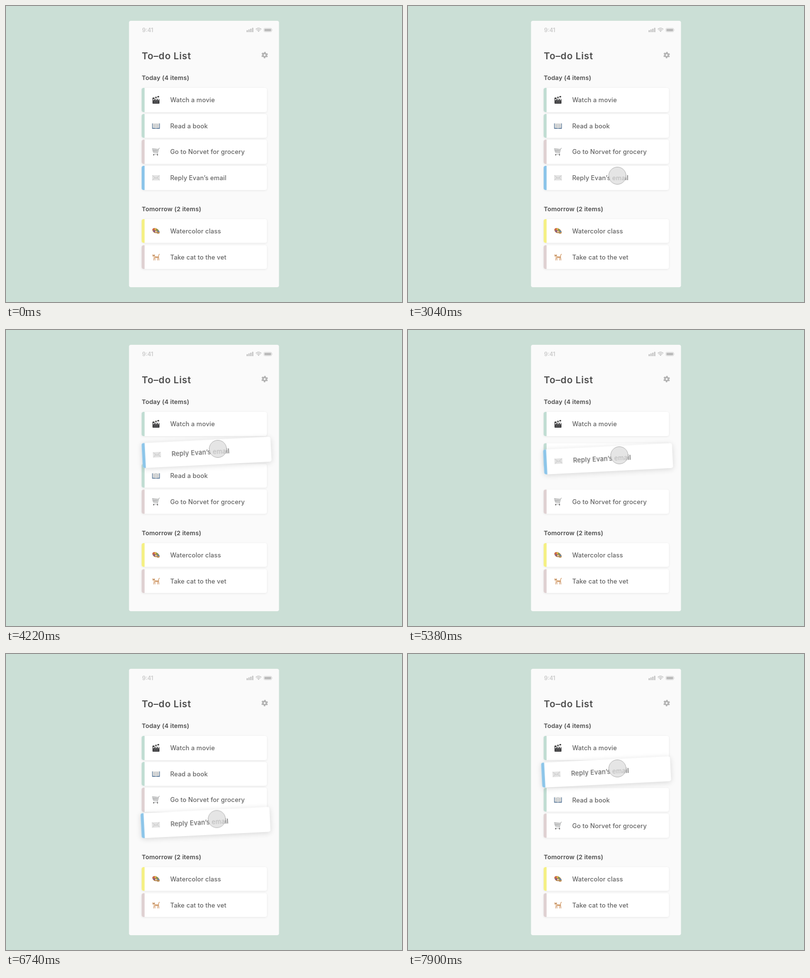
These frames come from a looping animation (800x600 px, 8000 ms). An HTML page:

```html
<!DOCTYPE html>
<html lang="en">
<head>
<meta charset="utf-8">
<title>To-do list</title>
<style>
  html, body { margin: 0; width: 100%; height: 100%; overflow: hidden; background: #cbdfd6; }
  #view { position: relative; width: 800px; height: 600px; font-family: Inter, sans-serif; background: #fafafa; clip-path: inset(30px 248.5px round 4px); }
  #view > svg { position: absolute; left: 0; top: 0; }
  .row { position: absolute; left: 274px; width: 252.5px; height: 48.5px; }
  .card { position: absolute; inset: 0; border-radius: 4px; background: #fff; box-shadow: 0 1px 4px rgba(0, 0, 0, .08); }
  .bar { position: absolute; left: 0; top: 0; width: 6px; height: 100%; border-radius: 4px 0 0 4px; }
  .card svg { position: absolute; left: 20.8px; top: 16.3px; width: 16px; height: 16px; overflow: visible; }
  .card span { position: absolute; left: 57.7px; top: 0; line-height: 49.8px; font-size: 12.6px; font-weight: 500; letter-spacing: .15px; color: #636363; white-space: pre; }
  #touch { position: absolute; left: -18.25px; top: -18.25px; width: 36.5px; height: 36.5px; box-sizing: border-box; border-radius: 50%; border: 1px solid #b0b0b0; }
</style>
</head>
<body>
<div id="view">
  <svg width="800" height="600" font-weight="600" fill="#4c4c4c">
    <text x="275" y="52.8" font-size="11.2" fill="#c9c9c9">9:41</text>
    <text x="274.3" y="107.7" font-size="19" letter-spacing=".65">To–do List</text>
    <g font-size="12.4" letter-spacing=".18">
      <text x="274.3" y="150">Today (4 items)</text>
      <text x="274.3" y="415.5">Tomorrow (2 items)</text>
    </g>
    <g fill="#c4c4c4">
      <path d="M486 49h2.6v4H486zM489.7 47.6h2.6V53h-2.6zM493.4 46h2.6v7h-2.6zM497.1 44.2h2.6V53h-2.6z"/>
      <rect x="520.9" y="45" width="16" height="7.4" rx="2" fill="none" stroke="#d2d2d2" stroke-width=".8"/>
      <rect x="522.2" y="46.2" width="13.4" height="5" rx="1" fill="#b9b9b9"/>
      <path d="M537.6 47.4q1.4 1.3 0 2.6z"/>
      <path d="M508.2 50.4q2-1.6 4 0l-2 2.4z"/>
    </g>
    <g fill="none" stroke="#c0c0c0" stroke-width="1.5">
      <path d="M504.6 47.2q5.6-4.8 11.2 0M506.5 49.2q3.7-3 7.4 0"/>
    </g>
    <g transform="translate(522.5 99.5)">
      <circle r="3.5" fill="none" stroke="#b2b2b2" stroke-width="3"/>
      <circle r="5.5" fill="none" stroke="#b2b2b2" stroke-width="2.2" stroke-dasharray="2.9 2.86" stroke-dashoffset="-1.43"/>
    </g>
  </svg>
</div>
<script>
const LOOP = 8000, STEP = 20, PITCH = 52.5;
const view = document.getElementById('view');

const icons = {
  clapper: `<path d="M1 6.6h14V15a1 1 0 0 1-1 1H2a1 1 0 0 1-1-1z" fill="#3d3d3f"/>
    <path d="M.6 4.2 13.8.2l.8 2.5L1.4 6.8z" fill="#333"/>
    <path d="m3.6 3.3 2 2.1 2-.6-2-2.1zM8.2 1.9l2 2.1 2-.6-2-2.1zM3 6.8 1.8 9h2.3l1.2-2.2zM7.7 6.8 6.5 9h2.3L10 6.8zM12.3 6.8 11.1 9h2.3l1.2-2.2z" fill="#f2f2f2"/>
    <path d="M3 11.2h10M3 13.4h10" stroke="#77787a" stroke-width=".7"/>`,
  book: `<path d="M.2 3h15.6v10.8H.2z" fill="#4f6f92"/>
    <path d="M1.4 2.2Q5 1.5 8 3.2q3-1.7 6.6-1v10Q11 11.4 8 13q-3-1.6-6.6-.8z" fill="#eeeeec"/>
    <path d="M8 3.2V13M2.6 4.8h4M2.6 6.6h4M2.6 8.4h4M2.6 10.2h4M9.4 4.8h4M9.4 6.6h4M9.4 8.4h4M9.4 10.2h4" stroke="#a5a9ae" stroke-width=".8"/>`,
  cart: `<g transform="matrix(-1 0 0 1 16 0)"><path d="M2.6 3.6 15.4 2l-2 7.6-8.4.6z" fill="#ebebeb"/>
    <g fill="none" stroke="#97989a" stroke-width=".8"><path d="M.3 1.3h1.8L5 11.8l-.8 1.4h9.6M2.6 3.6 15.4 2l-2 7.6-8.4.6M3.5 6.6l11-.9M6 3.2l1.2 6.8M9.2 2.8l.6 7M12.4 2.4l-.6 7.2"/></g>
    <circle cx="5" cy="14.7" r="1.2" fill="#666"/><circle cx="12.6" cy="14.7" r="1.2" fill="#666"/></g>`,
  letter: `<rect x=".3" y="2.9" width="15.4" height="10.6" rx=".8" fill="#e3e3e3"/>
    <path d="M.6 13.2 6.2 7.8M15.4 13.2 9.8 7.8M.6 3.2 7 8.9q1 .8 2 0l6.4-5.7" fill="none" stroke="#bdbdbd" stroke-width=".8"/>`,
  palette: `<path d="M.7 4.6C2.6.6 9 1.6 13 5.8c3.4 3.8 3.2 7.4-.2 7.8-2.2.2-2.4-1.7-4.6-1.4-2.2.3-4-.1-5.6-2.2C1 8 .1 6 .7 4.6z" fill="#b0804f"/>
    <circle cx="3.3" cy="4.6" r="1.7" fill="#e0564d"/><circle cx="6.8" cy="4.1" r="1.6" fill="#f0c443"/>
    <circle cx="10.3" cy="6" r="1.6" fill="#62ab58"/><circle cx="4.2" cy="8.2" r="1.6" fill="#824fa0"/>
    <circle cx="12.8" cy="9" r="1.5" fill="#458fd0"/><circle cx="8" cy="9.4" r="1.3" fill="#f3ebdd"/>
    <path d="m6.4 6.2 8.2 7" stroke="#e0a850"/>`,
  cat: `<path d="M13.4 7.4q-.8-3.6 1.6-5.4" fill="none" stroke="#d59d6b" stroke-width="1.2" stroke-linecap="round"/>
    <path d="m1.2 2 1.3 1.2h1.8L5.6 2l.4 4.2q3.8.8 7.6.4.9 1.4.4 3.2H4Q2.8 8.6 2.4 7.4 0 6.4 1.2 2z" fill="#dfb084"/>
    <path d="m4 9.2-.9 5.4M5.8 9.4l.3 5.2M11.6 9.4l-.3 5.2M13.4 9.2l.7 5.4" stroke="#d3a076" stroke-width="1.3"/>
    <path d="M2 6q1.5 1.2 3 0l-.4 3.2-1.4-.4z" fill="#f6e7d6"/>
    <path d="M2.3 4.8h.8M4.1 4.8h.8" stroke="#4a3a30" stroke-width=".9"/>
    <path d="m8 6.8.4 2M10 6.9l.4 2M12 6.9l.4 2" stroke="#a96f41" stroke-width=".7"/>`
};

const GREEN = '#c1ddd3', PINK = '#dfd1d2', BLUE = '#8cc5e9', YELLOW = '#f5f084';
const items = [
  ['movie', 166.2, GREEN, 'clapper', 'Watch a movie'],
  ['read', 218.7, GREEN, 'book', 'Read a book'],
  ['shop', 271.2, PINK, 'cart', 'Go to Norvet for grocery'],
  ['paint', 431.9, YELLOW, 'palette', 'Watercolor class'],
  ['vet', 484.6, PINK, 'cat', 'Take cat to the vet'],
  ['mail', 323.7, BLUE, 'letter', 'Reply Evan’s email']
];
const rows = {};
for (const [id, top, color, icon, label] of items) {
  const row = rows[id] = document.createElement('div');
  row.className = 'row';
  row.style.top = top + 'px';
  row.innerHTML = `<div class="card"><div class="bar" style="background:${color}"></div>
    <svg viewBox="0 0 16 16">${icons[icon]}</svg><span>${label}</span></div>`;
  view.append(row);
}
const touch = document.createElement('div');
touch.id = 'touch';
view.append(touch);

// Monotone cubic through [time, value] points, held flat outside them
function curve(pts) {
  const n = pts.length;
  const rate = i => (pts[i + 1][1] - pts[i][1]) / (pts[i + 1][0] - pts[i][0]);
  const slope = pts.map((_, i) => {
    if (i === 0 || i === n - 1) return 0;
    const a = rate(i - 1), b = rate(i);
    return a * b > 0 ? 2 * a * b / (a + b) : 0;
  });
  return t => {
    if (t <= pts[0][0]) return pts[0][1];
    if (t >= pts[n - 1][0]) return pts[n - 1][1];
    let i = 0;
    while (t >= pts[i + 1][0]) i++;
    const [t0, v0] = pts[i], [t1, v1] = pts[i + 1];
    const d = t1 - t0, u = (t - t0) / d, w = 1 - u;
    return v0 * w * w * (1 + 2 * u) + v1 * u * u * (1 + 2 * w) + d * u * w * (slope[i] * w - slope[i + 1] * u);
  };
}

function play(el, style) {
  const frames = [];
  for (let t = 0; t <= LOOP; t += STEP) {
    frames.push({ offset: t / LOOP, easing: 'steps(1, end)', ...style(t) });
  }
  el.animate(frames, { duration: LOOP, iterations: Infinity });
}

const path = [
  [840, 577, 28], [1640, 449, 265], [1980, 449, 265], [2620, 423, 344],
  [3380, 423, 344], [3540, 424, 322], [3920, 427, 266], [4220, 428, 241], [4520, 427.8, 228], [4820, 427.5, 223],
  [5220, 427.5, 223], [5380, 427, 254], [5700, 426, 303], [5980, 425, 329], [6040, 424.8, 332.5], [6460, 424, 346],
  [6620, 424, 346], [6800, 426.5, 326], [7160, 426, 273], [7440, 424.5, 241.5], [7900, 423, 232]
];
const x = curve(path.map(p => [p[0], p[1]]));
const y = curve(path.map(p => [p[0], p[2]]));
const lift = curve([[3380, 0], [3700, 1]]);
const shift = {
  read: curve([[3960, 0], [4225, 1], [5230, 1], [5440, 0], [7180, 0], [7430, 1]]),
  shop: curve([[3620, 0], [3860, 1], [5580, 1], [5820, 0], [6830, 0], [7080, 1]])
};

play(touch, t => ({
  translate: `${x(t)}px ${y(t)}px`,
  backgroundColor: `rgba(221, 221, 221, ${t < 3040 ? .45 : .75})`
}));
play(rows.mail, t => ({
  translate: t < 3400 ? '0px 0px' : `${x(t) - 423}px ${y(t) - 344}px`
}));
play(rows.mail.firstElementChild, t => {
  const v = lift(t);
  return {
    transform: `translate(${-.3 * v}px, ${2.5 * v}px) rotate(${-2.9 * v}deg) scale(${1 + .03 * v})`,
    boxShadow: `0 ${1 + v}px ${4 + 7 * v}px rgba(0, 0, 0, ${.08 + .06 * v})`
  };
});
for (const id in shift) play(rows[id], t => ({ translate: `0px ${shift[id](t) * PITCH}px` }));
</script>
</body>
</html>
```
